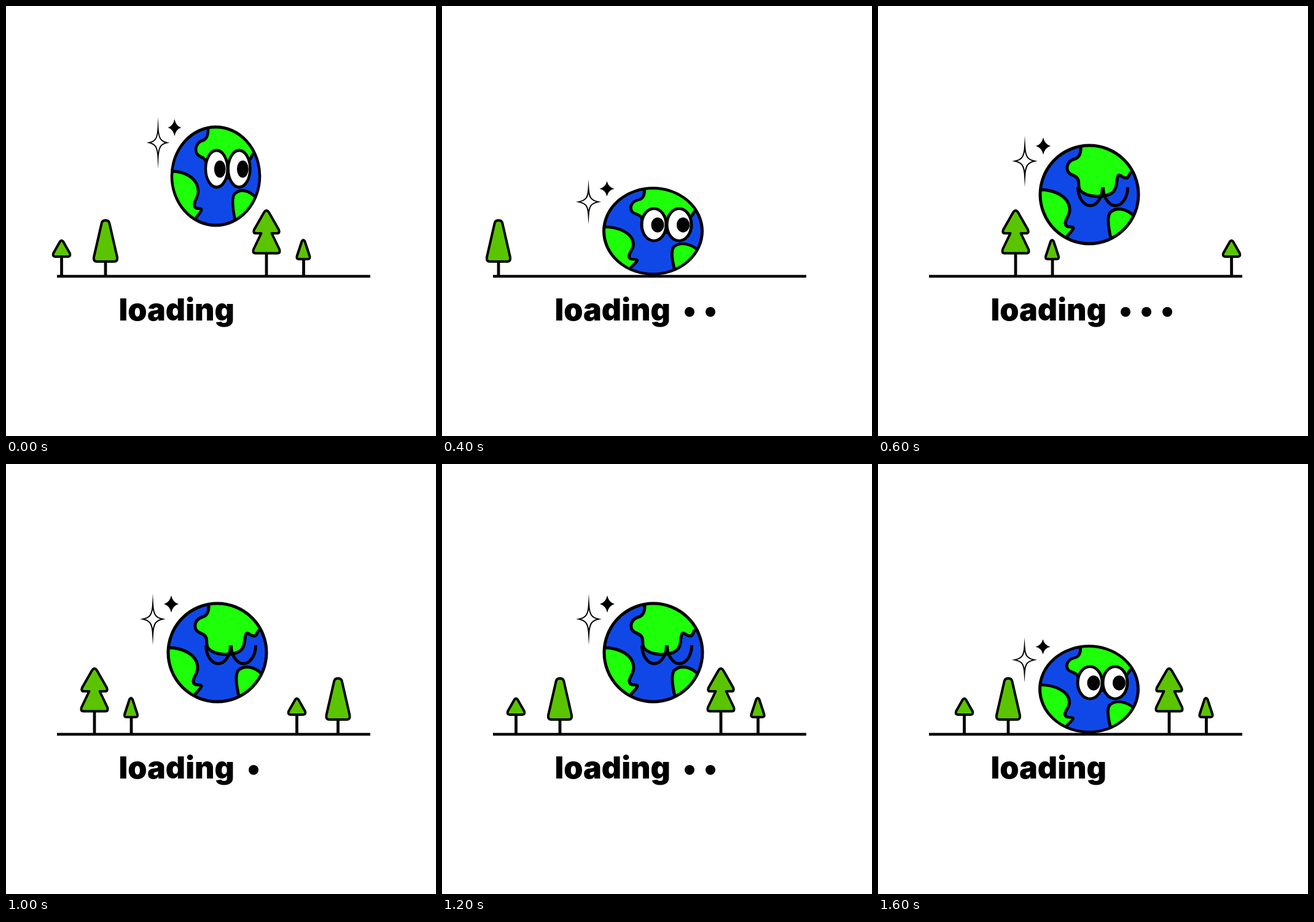
Recreate the animation shown at these times as an HTML page. Size 700 px wide and 700 px high, loop 1.8 s.

```html
<!DOCTYPE html>
<html lang="en">
<head>
<meta charset="utf-8">
<title>loading</title>
<style>
  html, body { margin: 0; width: 100%; height: 100%; overflow: hidden; background: #fff; }
  svg { display: block; width: 100%; height: 100%; }
  text { font: 900 50px Inter, "Noto Sans", sans-serif; }
  .tree { fill: #5bc400; stroke: #000; stroke-width: 4; stroke-linejoin: round; }
  .trunk { stroke-width: 4.8; }
  .ink { fill: none; stroke: #000; stroke-width: 5; stroke-linejoin: round; }
  .land { fill: #1eff0a; stroke: #000; stroke-width: 5; stroke-linejoin: round; }
</style>
</head>
<body>
<svg viewBox="0 0 700 700">
  <defs><clipPath id="disc"><circle cx="344" cy="307" r="80"/></clipPath></defs>

  <g class="tree" id="bush">
    <path class="trunk" d="M0 408V442"/>
    <path d="M-2.6 383.5Q0 380 2.6 383.5L13.4 402.5Q15 408 10.5 408H-10.5Q-15 408 -13.4 402.5Z"/>
  </g>
  <g class="tree" id="cone">
    <path class="trunk" d="M0 416V440"/>
    <path d="M-6.2 353Q-5 349 0 349Q5 349 6.2 353L19 409Q20 416 14 416H-14Q-20 416 -19 409Z"/>
  </g>
  <g class="tree" id="fir">
    <path class="trunk" d="M0 402V440"/>
    <path d="M-4 336Q0 330 4 336L20 364Q22.5 370 17 370H8.5L21 396Q23 402.5 18 402.5H-18Q-23 402.5 -21 396L-8.5 370H-17Q-22.5 370 -20 364Z"/>
  </g>
  <g class="tree" id="sapling">
    <path class="trunk" d="M.5 412V440"/>
    <path d="M-2.4 383Q0 379 2.4 383L10.3 407Q11.5 412 8 412H-8Q-11.5 412 -10.3 407Z"/>
  </g>

  <path d="M83 440H593" stroke="#000" stroke-width="4.6"/>

  <g id="globe">
    <path d="M239 228C240 245 243.5 250 255 252.5C243.5 255 240 260 239 277.5C238 260 234.500 255 223 252.5C234.500 250 238 245 239 228Z"
      fill="#fff" stroke="#000" stroke-width="2" stroke-miterlimit="20"/>
    <path d="M269 214Q271.500 225.500 281 228Q271.500 230.500 269 242Q266.500 230.500 257 228Q266.500 225.500 269 214Z"/>
    <circle cx="344" cy="307" r="80" fill="#1048e8"/>
    <g class="land" clip-path="url(#disc)">
      <path d="M330 226C331 240 328 247 320 249C309 252 306 262 309 269C312 276 320 274 325 281C329 288 324 295 330 301C340 311 366 313 380 305C391 298 387 284 391 276C395 273 398 281 405 280C410 278 408 272 413 270L440 220L330 200Z"/>
      <path d="M260 299C290 298 312 312 312 332C312 342 305 346 305 354C306 363 315 357 318 361C318 366 312 368 305 379L240 400V299Z"/>
      <path d="M380 382C375 362 373 343 378 336C388 327 404 329 418 343L440 400Z"/>
    </g>
    <circle class="ink" cx="344" cy="307" r="80"/>
    <g id="open">
      <g fill="#fff" stroke="#000" stroke-width="5">
        <ellipse cx="345.500" cy="295" rx="20" ry="30"/>
        <ellipse cx="386.500" cy="295" rx="20" ry="30"/>
      </g>
      <ellipse cx="351.500" cy="295.500" rx="10.500" ry="14"/>
      <ellipse cx="393" cy="295.500" rx="10.500" ry="14"/>
    </g>
    <path id="shut" class="ink" d="M325.500 295A20 30 0 0 0 365.500 295M366.500 295A20 30 0 0 0 406.500 295"/>
  </g>

  <text x="183.5" y="512">loading</text>
  <g id="dots">
    <circle cx="403" cy="498" r="8"/>
    <circle cx="437" cy="498" r="8"/>
    <circle cx="471" cy="498" r="8"/>
  </g>
</svg>
<script>
const $ = id => document.getElementById(id);
const STEP = 200;
const TREES = ["bush", "cone", "fir", "sapling"].map($);
const dots = [...$("dots").children];

// centre x, centre y, scale x, scale y, eyes open
const HIGH = [341.5, 277, 0.895, 1, true];
const MID = [344, 307, 1, 1, false];
const LOW = [343.5, 366.5, 1, 0.875, true];

// globe pose, then the x of each tree (null = off stage)
const STEPS = [
  [HIGH, 90.5, 162, 424, 484],
  [MID, null, 122, 384, 444],
  [LOW, null, 92, null, null],
  [MID, 575.5, null, 224, 283.5],
  [HIGH, 503.5, 570.5, 174, 233.5],
  [MID, 473.5, 540.5, 144, 203.5],
  [MID, 120.5, 192, 454, 514],
  [LOW, 140.5, 212, 474, 534],
  [LOW, 140.5, 212, 474, 534]
];

const show = (el, on) => el.setAttribute("visibility", on ? "visible" : "hidden");

function draw(time) {
  const step = Math.floor(time / STEP) % STEPS.length;
  const [[cx, cy, sx, sy, awake], ...xs] = STEPS[step];
  $("globe").setAttribute("transform", `translate(${cx} ${cy}) scale(${sx} ${sy}) translate(-344 -307)`);
  show($("open"), awake);
  show($("shut"), !awake);
  TREES.forEach((tree, i) => {
    show(tree, xs[i] !== null);
    tree.setAttribute("transform", `translate(${xs[i] ?? 0} 0)`);
  });
  dots.forEach((dot, i) => show(dot, i < step % 4));
}

const start = performance.now();
function tick() {
  draw(performance.now() - start);
  requestAnimationFrame(tick);
}
tick();
</script>
</body>
</html>
```
